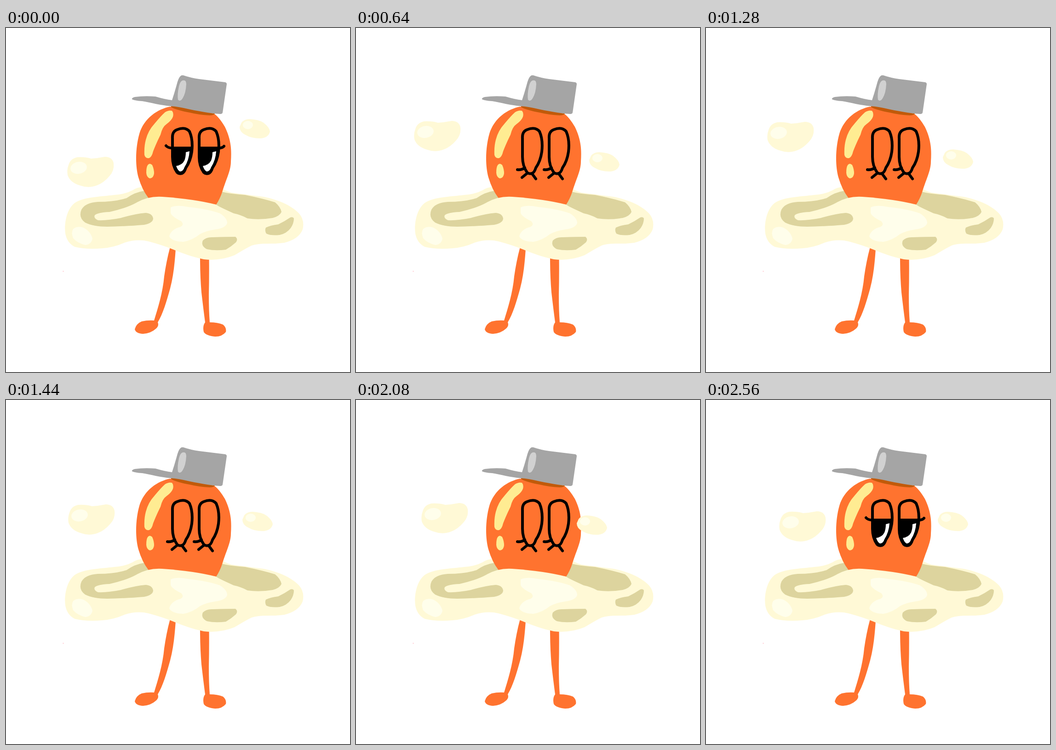
Animation of 748x748 px, one loop 2720 ms. Source, as an HTML page:

```html
<!DOCTYPE html>
<html lang="en">
<head>
<meta charset="utf-8">
<title>Egg character</title>
<style>
  html, body { margin: 0; width: 100%; height: 100%; overflow: hidden; background: #fff; }
  svg { display: block; width: 100%; height: 100%; }
  .orange { fill: #ff732f; }
  .cream { fill: #fff9d6; }
  .shine { fill: #fffeeb; }
  .shade { fill: #ddd49e; }
  .yellow { fill: #ffec92; }
  .ink { fill: none; stroke: #000; stroke-width: 6; stroke-linecap: round; stroke-linejoin: round; }
  .faint { fill: none; stroke: #fafafa; stroke-dasharray: 3 2; }
</style>
</head>
<body>
<svg viewBox="0 0 748 748">
  <defs>
    <path id="outline" class="ink" d="M362 240Q361 225 372 221Q390 214 399 225Q407 243 404 269Q401 290 391 304Q388 314 383 316Q376 318 372 314Q362 300 362 280Z"/>
    <g id="sleepyEye">
      <path d="M362 261H404Q402 288 391 304Q387 316 379 317Q371 315 366 301Q361 288 362 261Z"/>
      <path fill="#fff" d="M391 270L399 268Q398 287 388 303Q385 312 378 312Q373 309 370 300Q383 298 388 288Q391 280 391 270Z"/>
      <use href="#outline"/>
    </g>
    <g id="closedEye">
      <use href="#outline"/>
      <path class="ink" d="M351 308Q360 309 367 304M372 316L361 325M383 317L391 328"/>
    </g>
    <g id="openEye">
      <use href="#outline" style="fill:#fff"/>
      <path fill="#fff" d="M364 240Q364 228 373 224Q390 218 397 227Q403 245 401 268Q398 289 389 303L382 313H375L365 298Z"/>
      <path d="M361 268Q369 260 381 263Q391 267 391 280Q390 296 379 299Q369 301 362 294Z"/>
    </g>
  </defs>

  <path class="orange" d="M357 476L369 480C367 510 364 540 357 566C349 595 341 622 330 640Q333 647 327 653Q315 664 298 665Q282 664 280 655Q283 643 295 638Q308 635 322 636C330 610 341 575 344 540Q349 505 357 476Z"/>
  <path class="orange" d="M422 498H441.5Q442 540 441 580Q441 615 443 640Q460 640 472 645Q480 652 478 661Q470 671 455 671Q435 669 430 661Q427 648 433 640Q429 610 425 575Q422 540 422 498Z"/>

  <path class="cream" d="M300 345Q285 346 275 353Q258 362 235 363C205 367 170 367 150 380C132 393 126 425 129 447Q133 468 150 476Q175 482 210 479Q235 477 257 467Q285 458 310 464Q340 472 362 481Q400 497 430 503Q465 507 497 494Q520 480 534 473C555 466 580 471 605 467Q637 459 645 438Q650 418 637 403C620 385 590 373 560 367Q520 362 490 358Q472 352 465 345Z"/>
  <path class="shade" d="M301 354Q280 357 262 370Q235 378 200 378Q172 380 164 395Q157 412 172 423Q190 432 220 432Q265 431 300 428Q320 424 320 414Q318 403 304 402Q280 404 250 413Q220 419 200 418Q190 414 193 407Q200 401 225 400Q262 392 285 379L312 369Z"/>
  <path class="shade" d="M469 356Q490 361 520 363Q560 371 585 379Q597 389 599 400Q595 409 580 413Q550 418 525 414Q510 406 495 403Q475 394 455 384Z"/>
  <path class="shade" d="M565 434Q575 429 592 427Q605 421 618 412Q624 410 626 414Q626 425 619 435Q610 447 595 450Q575 452 566 447Q562 440 565 434Z"/>
  <path class="shade" d="M428 462Q436 454 450 455Q480 454 499 454Q505 459 500 466Q490 475 478 482Q455 485 437 481Q423 474 428 462Z"/>

  <path class="orange" d="M357 171C330 176 300 196 290 230C281 262 281 300 288 325Q296 352 310 370L457 384Q465 372 470 357C480 325 489 310 489 290C491 260 488 240 476 215Q463 193 452 186Z"/>
  <path class="cream" d="M285 379Q310 365 340 367Q410 372 457 384L480 400L450 410H340Q300 395 285 379Z"/>
  <path class="shine" d="M358 390Q372 384 395 389Q440 394 465 403Q481 413 481 424Q478 435 455 438Q435 441 422 448Q405 462 385 465Q360 464 355 453Q358 440 374 434Q390 430 381 420Q360 410 358 402Z"/>
  <path class="shine" d="M146 437Q155 430 168 434Q184 442 188 458Q186 470 173 472Q155 468 146 457Q141 445 146 437Z"/>

  <path class="yellow" d="M346 183Q354 178 361 180Q365 185 363 193Q360 201 349 209Q340 215 336 232Q327 250 320 268Q317 281 311 283Q303 284 301 276Q300 258 304 243Q309 223 323 208Q337 191 346 183Z"/>
  <path class="yellow" d="M309 297Q313 293 318 298Q322 307 322 316Q321 326 313 327Q306 325 305 315Q305 301 309 297Z"/>

  <path fill="#a5a5a5" d="M379 105Q381 102 386 103Q400 108 420 111L477 118Q480 119 480 122L471 184Q470 187 466 187Q430 185 395 179Q375 174 358 170C335 168 315 162 296 159Q280 158 274 155Q273 152 280 150Q300 147 325 149Q345 155 361 157Q366 142 371 124Q375 108 379 105Z"/>
  <path fill="#d1d1d1" d="M384 114Q392 112 392 122Q391 142 384 153Q379 161 374 156Q372 145 376 127Q379 115 384 114Z"/>
  <path fill="#c15a0a" d="M359 170Q375 171 400 177Q440 185 454 186Q452 190 443 190Q420 189 400 184Q372 179 359 172Z"/>

  <g id="sleepy">
    <use href="#sleepyEye"/><use href="#sleepyEye" x="58"/>
    <path class="ink" d="M348 256Q352 261 362 261H404M420 261H462Q471 261 474 257"/>
  </g>
  <g id="closed"><use href="#closedEye"/><use href="#closedEye" x="58"/></g>
  <g id="open">
    <use href="#openEye"/><use href="#openEye" x="57.5"/>
    <path class="ink" d="M357 218L367 227M376 210L375 221M354 242L362 240M448 208L445 219M464 217L455 227M469 237L462 240"/>
    <path class="faint" d="M516 80L562 75Q557 90 555 120Q553 145 551 165L515 168Q519 125 516 80Z"/>
    <ellipse class="faint" cx="538" cy="195" rx="19" ry="16"/>
  </g>

  <g id="leftDrop">
    <path class="cream" d="M136 298Q140 284 155 281Q172 280 185 284Q200 283 215 280Q231 280 234 294Q236 310 225 322Q212 337 198 342Q180 349 163 343Q140 337 134 320Q132 308 136 298Z"/>
    <ellipse class="shine" cx="158" cy="304" rx="18" ry="13" transform="rotate(-10 158 304)"/>
  </g>
  <g id="rightDrop">
    <path class="cream" d="M512 206Q518 198 530 198Q550 199 560 206Q573 216 574 225Q571 238 555 240Q535 241 520 232Q508 226 508 215Z"/>
    <ellipse class="shine" cx="526" cy="211" rx="11" ry="9"/>
  </g>
  <circle cx="124.5" cy="529" r="1" fill="#ffb9c4"/>
</svg>
<script>
  const STEP = 160, STEPS = 17;
  // Each key is [step, x offset, y offset].
  const drops = {
    leftDrop: [[0, 0, 0], [1, -12, -20], [2, -12, -39], [4, -7, -78], [5, -7, -100],
      [6, -3, -121], [9, 2, -53], [11, 2, -22], [14, 13, -73], [16, 26, -38]],
    rightDrop: [[0, 0, 0], [4, -1, 72], [6, 8, 108], [9, 6, 45], [11, -23, 44],
      [14, -30, 58], [16, -4, 45]]
  };
  const byId = id => document.getElementById(id);

  function offsetAt(keys, step) {
    const next = Math.max(1, keys.findIndex(key => key[0] >= step));
    const [s0, x0, y0] = keys[next - 1], [s1, x1, y1] = keys[next];
    const k = (step - s0) / (s1 - s0);
    return [Math.round(x0 + (x1 - x0) * k), Math.round(y0 + (y1 - y0) * k)];
  }

  function draw() {
    const step = Math.floor(performance.now() / STEP) % STEPS;
    const mood = step < 3 || step === 16 ? 'sleepy' : step < 14 ? 'closed' : 'open';
    for (const name of ['sleepy', 'closed', 'open'])
      byId(name).style.display = name === mood ? '' : 'none';
    for (const id in drops)
      byId(id).setAttribute('transform', `translate(${offsetAt(drops[id], step)})`);
    requestAnimationFrame(draw);
  }
  draw();
</script>
</body>
</html>
```
